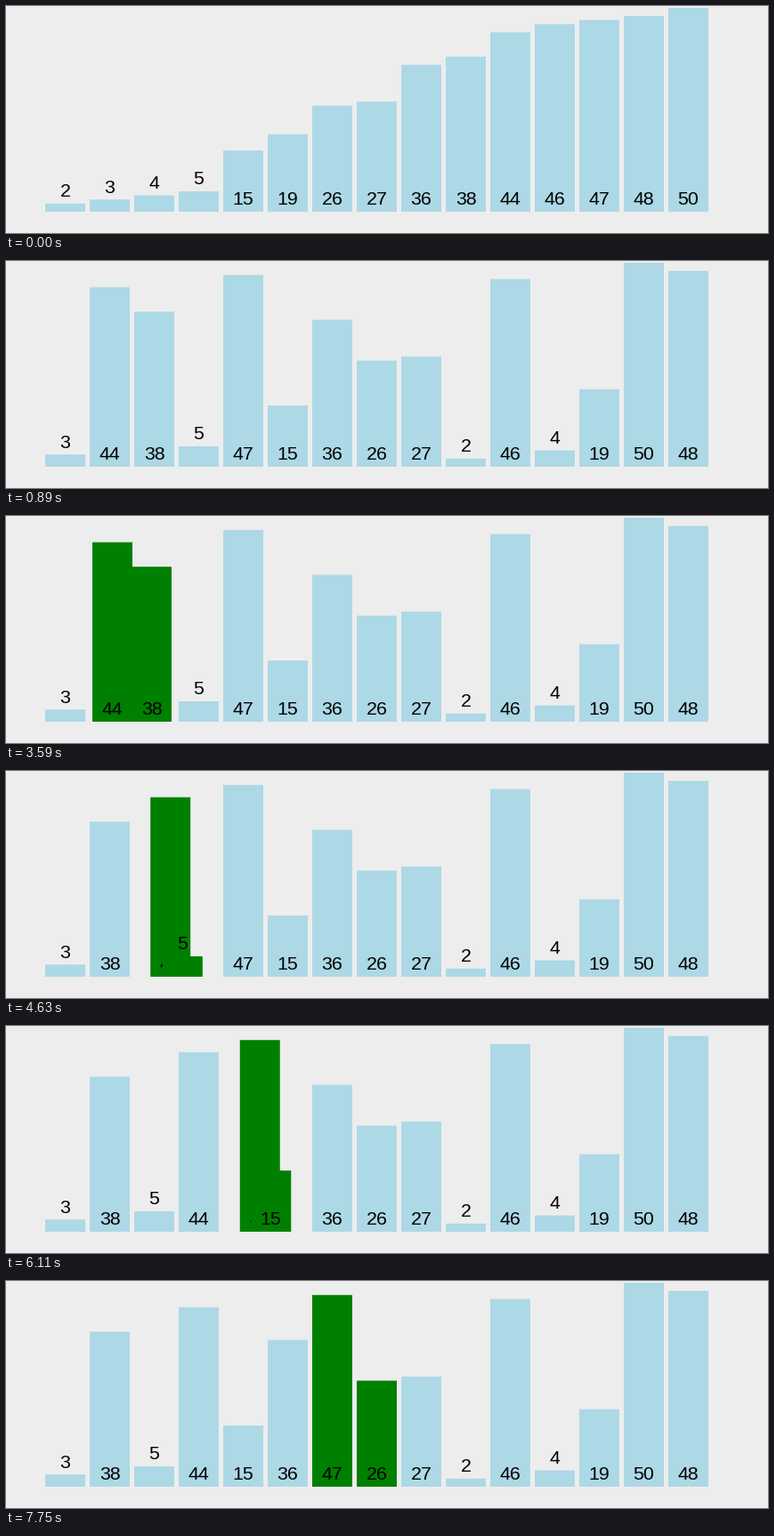
A matplotlib script that plays this animation: 856x256 px, repeating every 8000 ms.

```python
import numpy as np
import matplotlib.pyplot as plt
from matplotlib.animation import FuncAnimation
from matplotlib.colors import to_rgb
from matplotlib.patches import Rectangle

W, H, DPI = 856, 256, 100
INTERVAL, LOOP = 20, 8000
LEFT, PITCH, BAR_W, BASE, UNIT = 44, 50, 45, 232, 4.6
LABEL_GAP = 7.6
TRANSITION, REFRESH = 200, 150
BLUE, GREEN = np.array(to_rgb("lightblue")), np.array(to_rgb("green"))

SHUFFLED = [3, 44, 38, 5, 47, 15, 36, 26, 27, 2, 46, 4, 19, 50, 48]
VALUES = sorted(SHUFFLED)

# start, end, visible steps, time already elapsed at the first step, action, slot
EVENTS = [
    (600, 890, 3, 14, "shuffle", 0),
    (2690, 2840, 2, 104, "compare", 0),
    (3140, 3290, 2, 104, "compare", 1),
    (3590, 3890, 3, 15, "swap", 1),
    (4180, 4330, 2, 104, "compare", 2),
    (4630, 4780, 2, 46, "swap", 2),
    (5080, 5230, 2, 104, "compare", 3),
    (5670, 5820, 2, 104, "compare", 4),
    (6110, 6260, 2, 47, "swap", 4),
    (6550, 6700, 2, 104, "compare", 5),
    (7150, 7300, 2, 48, "swap", 5),
    (7600, 7750, 2, 104, "compare", 6),
]

# CSS "ease": cubic-bezier(.25, .1, .25, 1)
s = np.linspace(0, 1, 201)
EASE_X = 0.75 * s * (1 - s) ** 2 + 0.75 * s**2 * (1 - s) + s**3
EASE_Y = 0.3 * s * (1 - s) ** 2 + 3 * s**2 * (1 - s) + s**3


def ease(x):
    return float(np.interp(x, EASE_X, EASE_Y))


def apply(action, slot, order, active):
    order = list(order)
    if action == "shuffle":
        return SHUFFLED, active
    if action == "swap":
        order[slot], order[slot + 1] = order[slot + 1], order[slot]
        return order, active
    return order, set(order[slot:slot + 2])


states = [(VALUES, set())]
for *_, action, slot in EVENTS:
    states.append(apply(action, slot, *states[-1]))


def progress(t, start, end, steps, elapsed):
    step = min(steps - 1, int((t - start) / (end - start) * (steps - 1)))
    return ease((elapsed + REFRESH * step) / TRANSITION)


fig = plt.figure(figsize=(W / DPI, H / DPI), dpi=DPI, facecolor="#ededed")
ax = fig.add_axes([0, 0, 1, 1])
ax.set_xlim(0, W)
ax.set_ylim(H, 0)
ax.axis("off")

bars, labels = {}, {}
for v in VALUES:
    height = v * UNIT
    bars[v] = ax.add_patch(Rectangle((0, BASE - height), BAR_W, height,
                                     linewidth=0, snap=False))
    bottom = BASE if v > 5 else BASE - height
    labels[v] = ax.text(0, bottom - LABEL_GAP, str(v), ha="center",
                        va="baseline", color="black",
                        family="Liberation Sans", fontsize=21.4 * 72 / DPI)


def draw(n):
    t = n * INTERVAL + INTERVAL - 1
    i = sum(t >= e[0] for e in EVENTS)
    before, after = states[max(i - 1, 0)], states[i]
    p = progress(t, *EVENTS[i - 1][:4]) if i else 1
    for v in VALUES:
        a, b = before[0].index(v), after[0].index(v)
        x = LEFT + PITCH * (a + (b - a) * p)
        g0, g1 = v in before[1], v in after[1]
        bars[v].set_x(x)
        bars[v].set_facecolor(BLUE + (GREEN - BLUE) * (g0 + (g1 - g0) * p))
        bars[v].set_zorder(a + 1)
        labels[v].set_x(x + BAR_W / 2)
        labels[v].set_zorder(a + 1.5)
    return [*bars.values(), *labels.values()]


anim = FuncAnimation(fig, draw, frames=LOOP // INTERVAL, interval=INTERVAL,
                     repeat=True, repeat_delay=0, blit=False)
plt.show()
```
